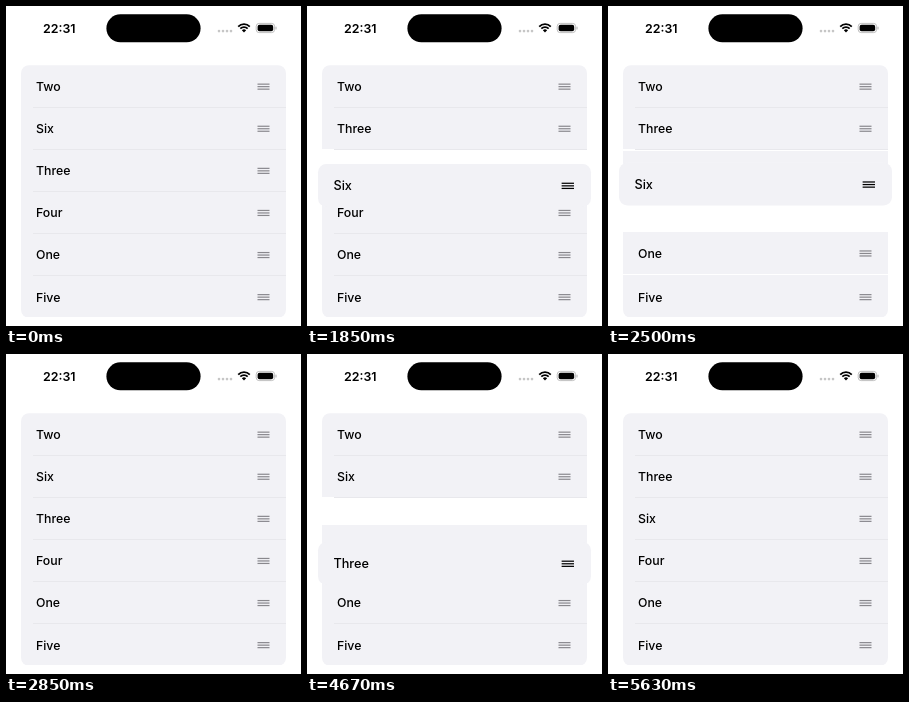
These frames come from a looping animation (295x320 px, 5.75 s). An HTML page with a canvas:

```html
<!DOCTYPE html>
<html lang="en">
<head>
<meta charset="utf-8">
<title>Reorderable list</title>
<style>
  html, body { margin: 0; width: 100%; height: 100%; overflow: hidden; background: #fff; }
  canvas { display: block; width: 295px; height: 320px; }
</style>
</head>
<body>
<canvas id="stage"></canvas>
<script>
const W = 295, H = 320, LOOP = 5750;
const LEFT = 15, WIDTH = 265, TOP = 59.2, ROW = 42.1, LIFT = 1.03, RADIUS = 8;
const CARD = '#f2f2f6', LINE = '#e8e8ec', GRIP = '#89888d';
const FONT = 'Inter, "Liberation Sans", sans-serif';
const ROWS = ['Two', 'Six', 'Three', 'Four', 'One', 'Five'];
const SETTLE = 140;

// Each drag pulls a row down by `depth` slots, then up to slot offset `end`.
const DRAGS = [
  { row: 'Six', from: 1310, to: 2850, tick: 108.8,
    down: 1390, downMs: 750, depth: 2.945, up: 2270, upMs: 240, end: 0 },
  { row: 'Three', from: 3990, to: 5630, tick: 115.5,
    down: 4400, downMs: 350, depth: 2.28, up: 4816, upMs: 480, end: -1 }
];

const canvas = document.getElementById('stage');
const ctx = canvas.getContext('2d');
const dpr = window.devicePixelRatio || 1;
canvas.width = W * dpr;
canvas.height = H * dpr;
ctx.scale(dpr, dpr);

const clamp = v => Math.max(0, Math.min(1, v));
const smooth = v => (v = clamp(v), v * v * (3 - 2 * v));
const unsmooth = v => 0.5 - Math.sin(Math.asin(1 - 2 * v) / 3);

function settle(ms) {
  const p = clamp(ms / SETTLE);
  return p < 0.5 ? 4 * p ** 3 : 1 - 4 * (1 - p) ** 3;
}

// Slots travelled by the dragged row.
function travel(d, t) {
  const down = smooth((t - d.down) / d.downMs);
  const up = smooth((t - d.up) / d.upMs);
  return d.depth * (down - up) + d.end * up;
}

// Moment at which an eased move from a to b passes a slot position.
function crossing(start, ms, a, b, at) {
  const x = (at - a) / (b - a);
  return x > 0 && x < 1 ? start + ms * unsmooth(x) : Infinity;
}

// Slots a resting row gives way while another is dragged past it.
function giveWay(d, i, t) {
  const k = i - ROWS.indexOf(d.row);
  const upper = k > 0 ? k - 1 : k;
  const goUp = crossing(d.down, d.downMs, 0, d.depth, upper + 0.5);
  const goDown = crossing(d.up, d.upMs, d.depth, d.end, upper + 0.9);
  return settle(t - goDown) - settle(t - goUp);
}

function offset(i, t) {
  let slots = 0;
  for (const d of DRAGS) slots += d.row === ROWS[i] ? travel(d, t) : giveWay(d, i, t);
  return slots * ROW;
}

function pill(x, y, w, h, r, color) {
  ctx.fillStyle = color;
  ctx.beginPath();
  ctx.roundRect(x, y, w, h, r);
  ctx.fill();
}

function label(text, x, y, size, weight) {
  ctx.font = `${weight} ${size}px ${FONT}`;
  ctx.fillStyle = '#000';
  ctx.fillText(text, x, y);
}

function content(name, cy, color) {
  label(name, 30, cy + 4.8, 12.3, 550);
  ctx.fillStyle = color;
  for (const dy of [-2.5, 0, 2.5]) ctx.fillRect(251.5, cy + dy - 0.2, 12, 1.2);
}

function drawRow(i, t) {
  const y = TOP + i * ROW + offset(i, t);
  const edge = Math.floor(y);
  ctx.fillStyle = CARD;
  ctx.fillRect(LEFT, edge, WIDTH, Math.floor(y + ROW) - edge);
  content(ROWS[i], y + ROW / 2, GRIP);
}

function drawLine(i, t) {
  const dy = offset(i, t);
  if (i === ROWS.length - 1 || dy % ROW !== 0) return;
  ctx.fillStyle = LINE;
  ctx.fillRect(27, Math.floor(TOP + (i + 1) * ROW + dy), LEFT + WIDTH - 27, 1);
}

function drawLifted(i, t) {
  ctx.save();
  ctx.translate(W / 2, TOP + (i + 0.5) * ROW + offset(i, t));
  ctx.scale(LIFT, LIFT);
  ctx.translate(-W / 2, 0);
  pill(LEFT, -20.7, WIDTH, 41.4, RADIUS, CARD);
  content(ROWS[i], 0, '#000');
  ctx.restore();
}

function drawWifi(x, y) {
  const a = -Math.PI * 3 / 4, b = -Math.PI / 4;
  ctx.fillStyle = ctx.strokeStyle = '#000';
  ctx.lineWidth = 1.8;
  for (const r of [5.2, 8.2]) {
    ctx.beginPath();
    ctx.arc(x, y, r, a, b);
    ctx.stroke();
  }
  ctx.beginPath();
  ctx.moveTo(x, y);
  ctx.arc(x, y, 3, a, b);
  ctx.fill();
}

function drawStatus() {
  label('22:31', 37, 26.5, 12.4, 600);
  pill(100.4, 8.3, 94.2, 28, 14, '#000');
  for (let i = 0; i < 4; i++) pill(211.7 + i * 4, 23.8, 2.6, 2.6, 1.3, '#c6c6c6');
  drawWifi(238, 26.4);
  ctx.strokeStyle = '#b0b0b0';
  ctx.lineWidth = 0.8;
  ctx.beginPath();
  ctx.roundRect(250.2, 17.4, 18.4, 9.2, 3);
  ctx.stroke();
  pill(251.6, 18.8, 15.6, 6.4, 1.9, '#000');
  pill(269.5, 20.5, 1, 3, 0.5, '#b0b0b0');
}

function draw(time) {
  const drag = DRAGS.find(d => time >= d.from && time < d.to);
  const t = drag ? time - (time - drag.from) % drag.tick : time;
  const lifted = drag ? ROWS.indexOf(drag.row) : -1;
  const resting = [...ROWS.keys()].filter(i => i !== lifted);

  ctx.fillStyle = '#fff';
  ctx.fillRect(0, 0, W, H);
  drawStatus();

  ctx.save();
  ctx.beginPath();
  ctx.roundRect(LEFT, TOP, WIDTH, ROW * ROWS.length, RADIUS);
  ctx.clip();
  resting.forEach(i => drawRow(i, t));
  resting.forEach(i => drawLine(i, t));
  ctx.restore();
  if (drag) drawLifted(lifted, t);
}

const start = performance.now();
function tick() {
  draw((performance.now() - start) % LOOP);
  requestAnimationFrame(tick);
}
tick();
</script>
</body>
</html>
```
